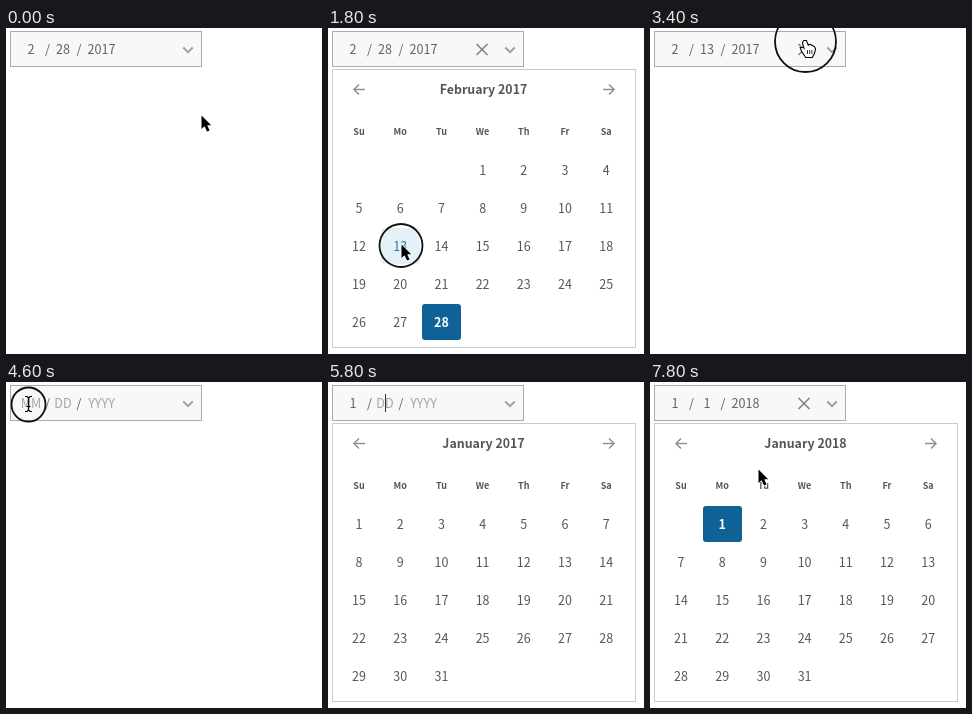
An HTML page with a canvas for the animation above (8 s loop, 316 by 326 pixels).

```html
<!DOCTYPE html>
<html lang="en">
<head>
<meta charset="utf-8">
<title>Date picker</title>
<style>
html, body { margin: 0; width: 100%; height: 100%; overflow: hidden; background: #fff; }
canvas { display: block; width: 316px; height: 326px; }
</style>
</head>
<body>
<canvas id="stage"></canvas>
<script>
const W = 316, H = 326, LOOP = 8000, STEP = 200;
const FONT = '"Noto Sans CJK JP", "Noto Sans CJK SC", "Noto Sans CJK", "Open Sans", sans-serif';
const INK = '#626262', BLUE = '#0f6196', PALE = '#e4f2f7';
const MONTHS = ['January', 'February'];
const WEEK = ['Su', 'Mo', 'Tu', 'We', 'Th', 'Fr', 'Sa'];

const canvas = document.getElementById('stage');
const ctx = canvas.getContext('2d');
const dpr = window.devicePixelRatio || 1;
canvas.width = W * dpr;
canvas.height = H * dpr;

// Field, calendar and caret states; each holds until the next one
const states = [
  { t: 0, date: ['2', '28', '2017'] },
  { t: 600, date: ['2', '28', '2017'], clear: true },
  { t: 800, date: ['2', '28', '2017'], clear: true, month: [2017, 1], picked: 28 },
  { t: 1600, date: ['2', '28', '2017'], clear: true, month: [2017, 1], picked: 28, hover: 13 },
  { t: 2000, date: ['2', '13', '2017'] },
  { t: 2800, date: ['2', '13', '2017'], clear: true },
  { t: 3600, date: ['', '', ''] },
  { t: 4800, date: ['', '', ''], month: [2017, 1], hover: 28, caret: 0 },
  { t: 5400, date: ['1', '', ''], month: [2017, 0], caret: 0 },
  { t: 5600, date: ['1', '', ''], month: [2017, 0], caret: 1 },
  { t: 6000, date: ['1', '1', ''], month: [2017, 0], caret: 1 },
  { t: 6200, date: ['1', '1', ''], month: [2017, 0], caret: 2 },
  { t: 6600, date: ['1', '1', '2'], month: [2, 0], caret: 2 },
  { t: 6800, date: ['1', '1', '20'], month: [20, 0], caret: 2 },
  { t: 7000, date: ['1', '1', '201'], month: [201, 0], caret: 2 },
  { t: 7400, date: ['1', '1', '2018'], clear: true, month: [2018, 0], picked: 1 }
];

// Pointer path: time, x, y, shape
const path = [
  [0, 195, 87, 'arrow'], [200, 195, 87, 'arrow'], [600, 181, 18, 'arrow'],
  [1000, 181, 18, 'arrow'], [1600, 73, 216, 'arrow'], [2000, 73, 216, 'arrow'],
  [2400, 92, 69, 'arrow'], [2800, 146, 24, 'hand'], [3200, 158, 21, 'hand'],
  [3600, 158, 21, 'hand'], [3800, 128, 22, 'beam'], [4400, 22, 22, 'beam'],
  [4800, 22, 22, 'beam'], [5000, 0, 0, ''], [7600, 108, 87, 'arrow'], [8000, 108, 87, 'arrow']
];

// Click rings: time, x, y, radius
const rings = [[800, 182, 20, 22], [1800, 73, 217.5, 21.5], [3400, 155.5, 13.5, 30.5], [4600, 22.5, 22.5, 17]];

const lastAt = (list, t, time) => list.filter(e => time(e) <= t).pop();

function text(str, x, y, size, color = INK, weight = 400, align = 'center') {
  ctx.font = `${weight} ${size}px ${FONT}`;
  ctx.textAlign = align;
  ctx.fillStyle = color;
  ctx.fillText(str, x, y);
}

function line(points, color, width) {
  ctx.beginPath();
  points.forEach(([x, y], i) => i ? ctx.lineTo(x, y) : ctx.moveTo(x, y));
  ctx.strokeStyle = color;
  ctx.lineWidth = width;
  ctx.stroke();
}

function box(x, y, w, h, fill, stroke) {
  ctx.fillStyle = fill;
  ctx.fillRect(x, y, w, h);
  ctx.strokeStyle = stroke;
  ctx.lineWidth = 1;
  ctx.strokeRect(x + 0.5, y + 0.5, w - 1, h - 1);
}

function drawField(s) {
  box(4, 3, 192, 36, '#f8f8f8', '#ababab');
  const centers = [25, 57, 95.5], hints = ['MM', 'DD', 'YYYY'];
  centers.forEach((x, i) => {
    const value = s.date[i];
    text(value || hints[i], x, 26, 12.6, value ? INK : '#a5a5a5');
    if (s.caret === i) {
      ctx.font = `400 12.6px ${FONT}`;
      const cx = Math.round(x + ctx.measureText(value).width / 2);
      line([[cx + 0.5, 12], [cx + 0.5, 30]], '#333', 1);
    }
  });
  text('/', 41.5, 26, 12.6);
  text('/', 73, 26, 12.6);
  if (s.clear) {
    line([[148.5, 16], [159.5, 27]], '#828282', 1.6);
    line([[159.5, 16], [148.5, 27]], '#828282', 1.6);
  }
  line([[177.3, 19.5], [182, 24.2], [186.7, 19.5]], '#a0a0a0', 2);
}

function drawArrow(x, dir) {
  line([[x - 5.5 * dir, 61.5], [x + 5 * dir, 61.5]], '#8b8b8b', 1.4);
  line([[x + 0.5 * dir, 56.5], [x + 5.5 * dir, 61.5], [x + 0.5 * dir, 66.5]], '#8b8b8b', 1.4);
}

function drawCalendar(s) {
  const [year, month] = s.month;
  const first = new Date(2000, month, 1);
  first.setFullYear(year);
  const offset = first.getDay();
  const days = month === 1 ? 28 : 31;
  const colX = c => 31 + c * 41.2;

  box(4, 41, 304, 279, '#fff', '#cbcbcb');
  drawArrow(31.5, -1);
  drawArrow(280.5, 1);
  text(`${MONTHS[month]} ${String(year).padStart(4, '0')}`, 155.5, 66, 12.4, '#555', 700);
  WEEK.forEach((d, c) => text(d, colX(c), 107, 9, '#555', 700));

  for (let d = 1; d <= days; d++) {
    const cell = offset + d - 1;
    const x = colX(cell % 7), y = 142 + Math.floor(cell / 7) * 38;
    const picked = d === s.picked;
    if (picked || d === s.hover) {
      ctx.fillStyle = picked ? BLUE : PALE;
      ctx.beginPath();
      ctx.roundRect(Math.round(x - 19.5), y - 18, 39, 36, 3);
      ctx.fill();
    }
    text(d, x, y + 4.5, 12.5, picked ? '#fff' : d === s.hover ? '#28748e' : '#555', picked ? 700 : 500);
  }
}

function shape(points, fill, stroke, width) {
  ctx.beginPath();
  points.forEach(([x, y], i) => i ? ctx.lineTo(x, y) : ctx.moveTo(x, y));
  ctx.closePath();
  ctx.lineWidth = width;
  ctx.strokeStyle = stroke;
  ctx.stroke();
  ctx.fillStyle = fill;
  ctx.fill();
}

const pointers = {
  arrow() {
    shape([[0.5, 0.5], [0.5, 14], [3.6, 11.2], [6, 16.6], [8.6, 15.4], [6.2, 10.2], [10.2, 10.2]], '#000', '#fff', 1.6);
  },
  hand() {
    shape([[-4, -8], [-2, -8], [0, -3], [2, -4], [4, -3], [6, -2], [7, 0], [6, 4], [4, 8],
      [-2, 8], [-6, 2], [-7, -1], [-5, -1], [-3, 1], [-5, -6]], '#fff', '#000', 2.2);
    [-0.5, 1.7, 3.9].forEach(x => line([[x, 1], [x, 5]], '#333', 1));
  },
  beam() {
    line([[-3, -7.5], [-1, -7.5], [0.5, -6], [2, -7.5], [4, -7.5]], '#000', 1.2);
    line([[0.5, -6], [0.5, 6]], '#000', 1.3);
    line([[-3, 7.5], [-1, 7.5], [0.5, 6], [2, 7.5], [4, 7.5]], '#000', 1.2);
    line([[-1.5, 2.5], [2.5, 2.5]], '#000', 1);
  }
};

function drawPointer(t) {
  const from = lastAt(path, t, p => p[0]);
  if (!from[3]) return;
  const next = path[path.indexOf(from) + 1];
  const to = next && next[3] ? next : from;
  const u = to === from ? 0 : (t - from[0]) / (to[0] - from[0]);
  const ease = u * u * (3 - 2 * u);
  ctx.save();
  ctx.translate(from[1] + (to[1] - from[1]) * ease, from[2] + (to[2] - from[2]) * ease);
  pointers[from[3]]();
  ctx.restore();
}

function drawRing(t) {
  const ring = rings.find(r => r[0] === t);
  if (!ring) return;
  ctx.beginPath();
  ctx.arc(ring[1], ring[2], ring[3], 0, Math.PI * 2);
  ctx.strokeStyle = '#111';
  ctx.lineWidth = 1.8;
  ctx.stroke();
}

function draw(now) {
  const t = Math.floor((now % LOOP) / STEP) * STEP;
  const s = lastAt(states, t, e => e.t);
  ctx.setTransform(dpr, 0, 0, dpr, 0, 0);
  ctx.fillStyle = '#fff';
  ctx.fillRect(0, 0, W, H);
  drawField(s);
  if (s.month) drawCalendar(s);
  drawRing(t);
  drawPointer(t);
}

let start;
function tick() {
  const now = performance.now();
  start ??= now;
  draw(now - start);
  requestAnimationFrame(tick);
}
tick();
</script>
</body>
</html>
```
